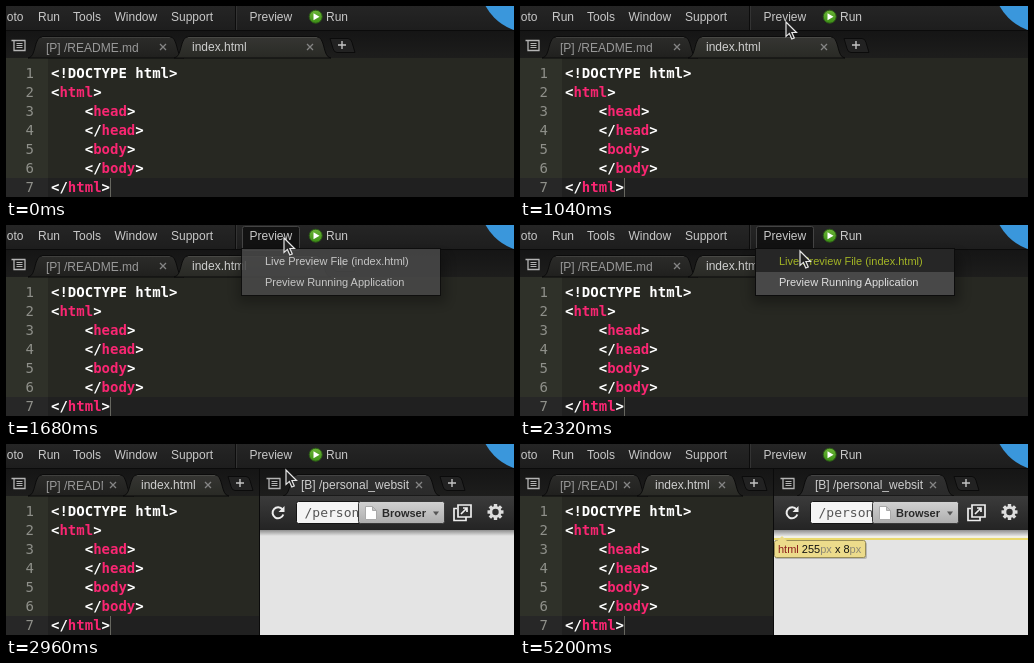
An HTML page that plays this animation: 508x191 px, repeating every 6.16 s.

```html
<!DOCTYPE html>
<html lang="en">
<head>
<meta charset="utf-8">
<title>Editor live preview</title>
<style>
  html, body { margin: 0; width: 100%; height: 100%; overflow: hidden; background: #272822; }
  svg { display: block; }
  text { font: 12px "Liberation Sans", Arial, sans-serif; fill: #c8c8c8; }
  .small { font-size: 11px; }
  .item { font-size: 11px; fill: #dedede; }
  .code { font: bold 14px "DejaVu Sans Mono", monospace; fill: #fff; }
  .tag { fill: #f92672; }
  .num { font-weight: normal; fill: #8f908a; text-anchor: end; }
</style>
</head>
<body>
<svg id="stage" width="508" height="191" viewBox="0 0 508 191"></svg>
<script>
const LOOP = 6160, STEP = 80;
const MENU_OPEN = 1680, PANE_OPEN = 2800, TITLE_SHOWN = 2960, INSPECT = 4160;

const rect = (x, y, w, h, fill, extra = '') =>
  `<rect x="${x}" y="${y}" width="${w}" height="${h}" fill="${fill}" ${extra}/>`;
const path = (d, fill, stroke = 'none', extra = '') =>
  `<path d="${d}" fill="${fill}" stroke="${stroke}" ${extra}/>`;
const text = (x, y, s, extra = '') => `<text x="${x}" y="${y}" ${extra}>${s}</text>`;
const group = (id, body) => `<g id="${id}">${body}</g>`;
const clipped = (x, y, w, h, body) =>
  `<svg x="${x}" y="${y}" width="${w}" height="${h}" viewBox="${x} ${y} ${w} ${h}">${body}</svg>`;
const gradient = (id, from, to) =>
  `<linearGradient id="${id}" x2="0" y2="1"><stop stop-color="${from}"/><stop offset="1" stop-color="${to}"/></linearGradient>`;

const defs = `<defs>
  ${gradient('bar', '#252525', '#1d1d1d')}
  ${gradient('strip', '#151515', '#1d1d1c')}
  ${gradient('active', '#363633', '#292a25')}
  ${gradient('idle', '#2c2c2a', '#20201e')}
  ${gradient('neutral', '#303030', '#2a2a2a')}
  ${gradient('tools', '#3b3b3b', '#242424')}
  ${gradient('button', '#d2d2d2', '#adadad')}
  ${gradient('shade', '#8e8e8e', '#e4e4e4')}
  ${gradient('run', '#6bb536', '#3c8f16')}
  <filter id="blur" x="-20%" y="-50%" width="140%" height="200%"><feGaussianBlur stdDeviation="6"/></filter>
</defs>`;

function tabShape(x1, x2, fill) {
  return path(`M${x1} 52C${x1 + 9} 51 ${x1 + 5} 30.5 ${x1 + 15} 30.5H${x2 - 15}C${x2 - 5} 30.5 ${x2 - 9} 51 ${x2} 52Z`,
    `url(#${fill})`, '#0b0b0b') +
    path(`M${x1 + 14} 31.5H${x2 - 14}`, 'none', '#ffffff18');
}

// Draws a tab; its label is cut off before the close mark.
function tab(x1, x2, label, fill) {
  const cx = x2 - 21, idle = fill === 'idle';
  return tabShape(x1, x2, fill) +
    clipped(x1 + 15, 30, x2 - x1 - 46, 22,
      text(x1 + 18, idle ? 46 : 45, label, `style="fill:${idle ? '#999' : '#cfcfcf'}"`)) +
    path(`M${cx - 3} 38l6 6m0-6l-6 6`, 'none', '#858585', 'stroke-width="1.3"');
}

const plus = x =>
  path(`M${x - 12} 32.5h18q3 0 4 4l3 10h-18q-3 0-4-4z`, '#222', '#0b0b0b') +
  path(`M${x - 4} 39h8m-4-4v8`, 'none', '#c4c4c4', 'stroke-width="1.4"');

const listIcon = x =>
  path(`M${x} 34.5h14M${x + 2.5} 34.5v10h11v-10`, 'none', '#b4b4b4', 'stroke-width="1.3"') +
  path(`M${x + 5} 37.5h6m-6 2h6m-6 2h6`, 'none', '#b4b4b4');

function toolbar() {
  const items = [[-8.5, 'Goto'], [32, 'Run'], [67, 'Tools'], [108.5, 'Window'], [165, 'Support']];
  return rect(0, 0, 508, 25, 'url(#bar)') +
    rect(0, 24, 508, 1, '#0b0b0b') +
    items.map(([x, s]) => text(x, 15, s)).join('') +
    rect(229, 0, 1, 24, '#0c0c0c') + rect(230, 0, 1, 24, '#333') +
    group('pressed', rect(236.5, 1.5, 57, 24, '#121212', 'stroke="#444" rx="2"')) +
    text(243.5, 15, 'Preview') +
    '<circle cx="309.7" cy="10.7" r="6.5" fill="url(#run)" stroke="#2d5a18"/>' +
    path('M307.5 7.2l6 3.5-6 3.5z', '#fff') +
    text(320, 15, 'Run');
}

const badge = '<circle cx="524" cy="-24" r="50.5" fill="#3a97dc"/>';

function editor() {
  const lines = [[0, '', '!DOCTYPE html'], [0, 'html'], [4, 'head'], [4, '/head'], [4, 'body'], [4, '/body'], [0, '/html']];
  return rect(0, 52, 508, 139, '#272822') + rect(0, 52, 42, 139, '#2f3129') +
    rect(0, 172, 42, 19, '#272727') + rect(42, 172, 466, 19, '#202020') +
    lines.map(([indent, tag, plain = ''], i) => {
      const y = 72 + i * 19;
      const slash = tag[0] === '/' ? '/' : '';
      return text(28, y, i + 1, 'class="code num"') +
        text(45 + indent * 8.43, y,
          `&lt;${plain}${slash}<tspan class="tag">${tag.replace('/', '')}</tspan>&gt;`, 'class="code"');
    }).join('') +
    rect(104, 172, 1, 19, '#66665f');
}

const strip = rect(0, 25, 508, 27, 'url(#strip)') + listIcon(5.5);
const wideTabs = tab(22, 178, '[P] /README.md', 'idle') + tab(168, 325, 'index.html', 'active') + plus(336);
const splitTabs = tab(22, 128, '[P] /README.md', 'idle') + tab(117, 223, 'index.html', 'active') + plus(234);

function gear(cx, cy) {
  const teeth = Array.from({ length: 8 }, (_, i) =>
    rect(cx - 1.7, cy - 8, 3.4, 4, '#ddd', `transform="rotate(${i * 45} ${cx} ${cy})"`)).join('');
  return teeth + `<circle cx="${cx}" cy="${cy}" r="4.6" fill="none" stroke="#ddd" stroke-width="2.8"/>`;
}

function inspector() {
  const unit = '<tspan fill="#8c8876">px</tspan>';
  return rect(254, 86, 254, 9, '#f1f0e6') + rect(254, 86, 254, 6, 'url(#shade)') +
    rect(254, 94, 254, 2, '#e9d96d') +
    rect(255, 98, 92, 17, '#000', 'opacity=".2" rx="2"') +
    rect(254.5, 96.5, 91, 17, '#ecdb8b', 'rx="2" stroke="#978c58"') +
    path('M257 97l5-5 5 5z', '#ecdb8b') +
    text(258, 109, `<tspan fill="#8b1a1a">html</tspan> 255${unit} x 8${unit}`, 'class="small" style="fill:#111"');
}

function previewPane() {
  return rect(253, 25, 255, 166, '#0b0b0b') + rect(254, 25, 254, 27, 'url(#strip)') +
    listIcon(260.5) + plus(446) +
    group('title', tab(277, 434, '[B] /personal_website', 'neutral')) +
    rect(254, 52, 254, 34, 'url(#tools)') +
    path('M276.5 65.5A5.5 5.5 0 1 0 277.3 70.5', 'none', '#eee', 'stroke-width="2"') + path('M278.5 62v6h-6z', '#eee') +
    rect(290.5, 57.5, 148, 22, '#f4f4f4', 'rx="2" stroke="#151515"') +
    clipped(291, 58, 61, 21, text(298.5, 73, '/personal_website', 'style="font:13px \'DejaVu Sans Mono\',monospace;fill:#555"')) +
    rect(352.5, 57.5, 86, 22, 'url(#button)', 'rx="2" stroke="#3a3a3a"') +
    path('M359.5 62.5h7l4 4v9h-11zM366.5 62.5v4h4', '#fff', '#aaa') +
    text(376, 73, 'Browser', 'class="small" style="font-weight:bold;fill:#292929"') +
    path('M427 67.5h6l-3 4z', '#555') +
    path('M451 64.5h-3v12h12v-3M452 61h13v12h-13zM455 70l6-6m-4 0h4v4', 'none', '#eee', 'stroke-width="1.7"') +
    gear(489.5, 68) +
    rect(254, 86, 254, 105, '#e4e4e4') + rect(254, 86, 254, 6, 'url(#shade)') +
    group('inspect', inspector());
}

const menu =
  rect(232, 30, 208, 48, '#000', 'opacity=".3" filter="url(#blur)"') +
  rect(235.5, 23.5, 199, 47, '#484848', 'stroke="#0c0c0c"') +
  group('hover', rect(236, 24, 198, 23, '#262626')) +
  text(259, 40, 'Live Preview File (index.html)', 'id="live" class="item"') +
  text(259, 61, 'Preview Running Application', 'class="item"');

const pointer = path('M0 0V14.5L3.4 11.4 5.8 17 8.3 15.9 5.9 10.5H10.5Z', '#222', '#e6e6e6', 'stroke-width="1.2"');

document.getElementById('stage').innerHTML = defs + editor() + strip +
  group('wide', wideTabs) + group('split', splitTabs + previewPane()) +
  toolbar() + badge + group('menu', menu) + group('pointer', pointer);

// Pointer tip: time, x, y
const route = [
  [560, 292, 162], [1040, 266, 16], [1120, 266, 15], [1440, 278, 13],
  [1920, 278, 13], [2320, 280, 26], [4800, 280, 26], [5200, 284, -20]
];

function pointerAt(t) {
  const i = Math.max(1, route.findIndex(key => key[0] > t));
  const [t0, x0, y0] = route[i - 1], [t1, x1, y1] = route[i];
  const u = (t - t0) / (t1 - t0), eased = 1 - (1 - u) ** 2;
  return [x0 + (x1 - x0) * eased, y0 + (y1 - y0) * eased];
}

const el = id => document.getElementById(id);
const show = (id, on) => { el(id).style.display = on ? '' : 'none'; };

function draw(now) {
  const t = Math.floor((now % LOOP) / STEP) * STEP;
  const pointing = t >= 560 && t < 5200;
  const menuOpen = t >= MENU_OPEN && t < PANE_OPEN;
  const [x, y] = pointing ? pointerAt(t) : [0, 0];
  const hovered = menuOpen && y > 23;

  show('pointer', pointing);
  el('pointer').setAttribute('transform', `translate(${x} ${y})`);
  show('pressed', menuOpen);
  show('menu', menuOpen);
  el('menu').style.opacity = t < MENU_OPEN + STEP ? 0.88 : 1;
  show('hover', hovered);
  el('live').style.fill = hovered ? '#a3b526' : '';
  show('wide', t < PANE_OPEN);
  show('split', t >= PANE_OPEN);
  show('title', t >= TITLE_SHOWN);
  show('inspect', t >= INSPECT);
  requestAnimationFrame(() => draw(performance.now()));
}
draw(0);
</script>
</body>
</html>
```
